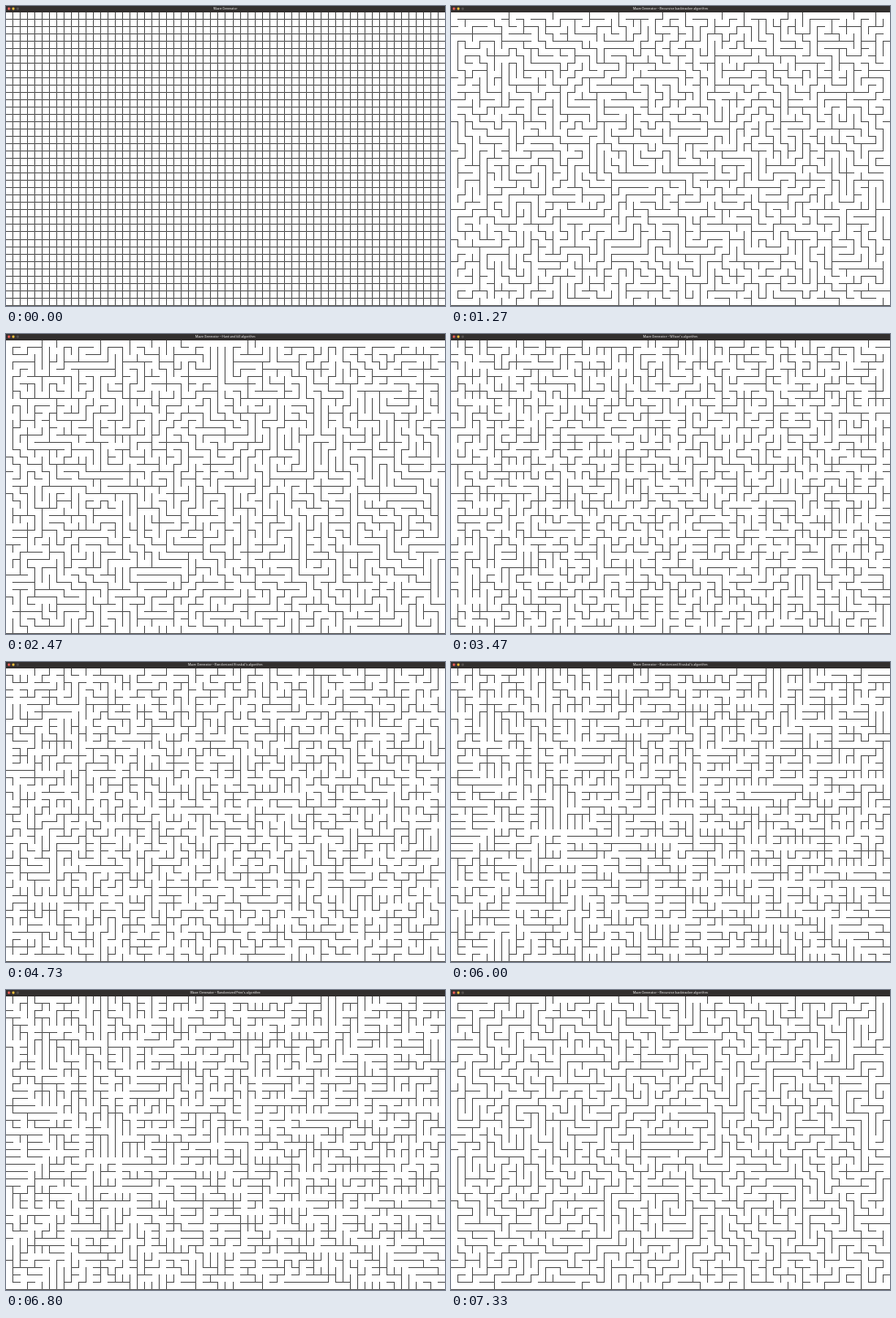
Recreate the animation shown at these times as an HTML page with a canvas. Size 480x328 px, loop 8 s.

```html
<!DOCTYPE html>
<html lang="en">
<head>
<meta charset="utf-8">
<title>Maze Generator</title>
<style>
  html, body { margin: 0; width: 100%; height: 100%; overflow: hidden; background: #fff; }
  canvas { display: block; }
</style>
</head>
<body>
<canvas id="stage" width="480" height="328"></canvas>
<script>
const ctx = document.getElementById('stage').getContext('2d');
const COLS = 60, ROWS = 40, CELLS = COLS * ROWS, LOOP = 8000;

function seeded(seed) {
  return () => {
    seed = (seed + 0x6D2B79F5) | 0;
    let t = Math.imul(seed ^ (seed >>> 15), 1 | seed);
    t = (t + Math.imul(t ^ (t >>> 7), 61 | t)) ^ t;
    return ((t ^ (t >>> 14)) >>> 0) / 4294967296;
  };
}

function neighbours(c) {
  const x = c % COLS, list = [];
  if (x > 0) list.push(c - 1);
  if (x < COLS - 1) list.push(c + 1);
  if (c >= COLS) list.push(c - COLS);
  if (c < CELLS - COLS) list.push(c + COLS);
  return list;
}

// A maze records which cells are open to the right and downwards.
function newMaze(seed) {
  const rnd = seeded(seed);
  const maze = {
    right: new Uint8Array(CELLS),
    down: new Uint8Array(CELLS),
    seen: new Uint8Array(CELLS),
    int: n => Math.floor(rnd() * n),
    pick: list => list[Math.floor(rnd() * list.length)],
    fresh: c => neighbours(c).filter(n => !maze.seen[n]),
    known: c => neighbours(c).filter(n => maze.seen[n]),
    join(a, b) {
      const side = Math.abs(a - b) === 1 ? maze.right : maze.down;
      side[Math.min(a, b)] = 1;
    }
  };
  return maze;
}

function backtracker(seed) {
  const m = newMaze(seed), stack = [m.int(CELLS)];
  m.seen[stack[0]] = 1;
  while (stack.length) {
    const c = stack[stack.length - 1], next = m.pick(m.fresh(c));
    if (next === undefined) { stack.pop(); continue; }
    m.join(c, next);
    m.seen[next] = 1;
    stack.push(next);
  }
  return m;
}

function huntAndKill(seed) {
  const m = newMaze(seed);
  let c = m.int(CELLS);
  m.seen[c] = 1;
  while (c !== undefined) {
    const next = m.pick(m.fresh(c));
    if (next !== undefined) {
      m.join(c, next);
      m.seen[next] = 1;
      c = next;
      continue;
    }
    c = undefined;
    for (let hunt = 0; hunt < CELLS; hunt++) {
      if (m.seen[hunt]) continue;
      const link = m.pick(m.known(hunt));
      if (link === undefined) continue;
      m.join(hunt, link);
      m.seen[hunt] = 1;
      c = hunt;
      break;
    }
  }
  return m;
}

function wilson(seed) {
  const m = newMaze(seed), exit = new Int16Array(CELLS);
  m.seen[m.int(CELLS)] = 1;
  for (let start = 0; start < CELLS; start++) {
    let c = start;
    while (!m.seen[c]) c = exit[c] = m.pick(neighbours(c));
    for (c = start; !m.seen[c]; c = exit[c]) {
      m.join(c, exit[c]);
      m.seen[c] = 1;
    }
  }
  return m;
}

function kruskal(seed) {
  const m = newMaze(seed), edges = [];
  const parent = Array.from({ length: CELLS }, (_, i) => i);
  const root = c => {
    while (parent[c] !== c) c = parent[c] = parent[parent[c]];
    return c;
  };
  for (let c = 0; c < CELLS; c++) {
    for (const n of neighbours(c)) if (n > c) edges.push([c, n]);
  }
  for (let i = edges.length - 1; i > 0; i--) {
    const j = m.int(i + 1);
    [edges[i], edges[j]] = [edges[j], edges[i]];
  }
  for (const [a, b] of edges) {
    if (root(a) === root(b)) continue;
    parent[root(a)] = root(b);
    m.join(a, b);
  }
  return m;
}

// Each cell joins the one that first reached it, so walls radiate from the start.
function prim(seed) {
  const m = newMaze(seed), frontier = [24 * COLS + 15];
  m.seen[frontier[0]] = 1;
  while (frontier.length) {
    const i = m.int(frontier.length), c = frontier[i];
    frontier[i] = frontier[frontier.length - 1];
    frontier.pop();
    for (const n of m.fresh(c)) {
      m.seen[n] = 1;
      m.join(c, n);
      frontier.push(n);
    }
  }
  return m;
}

const NAME = 'Maze Generator';
const titled = name => `${NAME} – ${name} algorithm`;
const BACK = titled('Recursive backtracker');
const KRUSKAL = titled("Randomized Kruskal's");
const PRIM = titled("Randomized Prim's");

const primMaze = prim(61), lastMaze = backtracker(72);
const scenes = [
  [0, newMaze(1), NAME],
  [1270, backtracker(12), BACK],
  [2470, huntAndKill(24), titled('Hunt and kill')],
  [3470, wilson(34), titled("Wilson's")],
  [4730, kruskal(47), KRUSKAL],
  [6000, primMaze, KRUSKAL],
  [6070, primMaze, PRIM],
  [7270, lastMaze, PRIM],
  [7330, lastMaze, BACK]
];

const lineX = i => Math.floor(8.013 * i - 0.4);
const lineY = j => Math.floor(6.6 + 8.013 * j);

function drawMaze(m) {
  ctx.fillStyle = '#fff';
  ctx.fillRect(0, 0, 480, 328);
  ctx.fillStyle = '#5c5c5c';
  for (let c = 0; c < CELLS; c++) {
    const x = c % COLS, y = Math.floor(c / COLS);
    const left = lineX(x), top = lineY(y), right = lineX(x + 1), bottom = lineY(y + 1);
    if (!m.right[c]) ctx.fillRect(right, top, 1, bottom - top + 1);
    if (!m.down[c]) ctx.fillRect(left, bottom, right - left + 1, 1);
  }
}

function drawBar(title) {
  ctx.fillStyle = '#322f2e';
  ctx.fillRect(0, 0, 480, 7);
  ['#f25e57', '#f3bd3c', '#55514f'].forEach((color, i) => {
    ctx.fillStyle = color;
    ctx.beginPath();
    ctx.arc(3.2 + 4.8 * i, 3, 1.45, 0, 2 * Math.PI);
    ctx.fill();
  });
  ctx.fillStyle = '#c4c2c1';
  ctx.font = '600 3.35px Inter, "Open Sans", sans-serif';
  ctx.textAlign = 'center';
  ctx.textBaseline = 'alphabetic';
  ctx.fillText(title, 239.8, 4.2);
}

let shown = null;
function frame() {
  const t = performance.now() % LOOP;
  const scene = scenes.filter(s => s[0] <= t).pop();
  if (scene !== shown) {
    shown = scene;
    drawMaze(scene[1]);
    drawBar(scene[2]);
  }
  requestAnimationFrame(frame);
}
frame();
</script>
</body>
</html>
```
